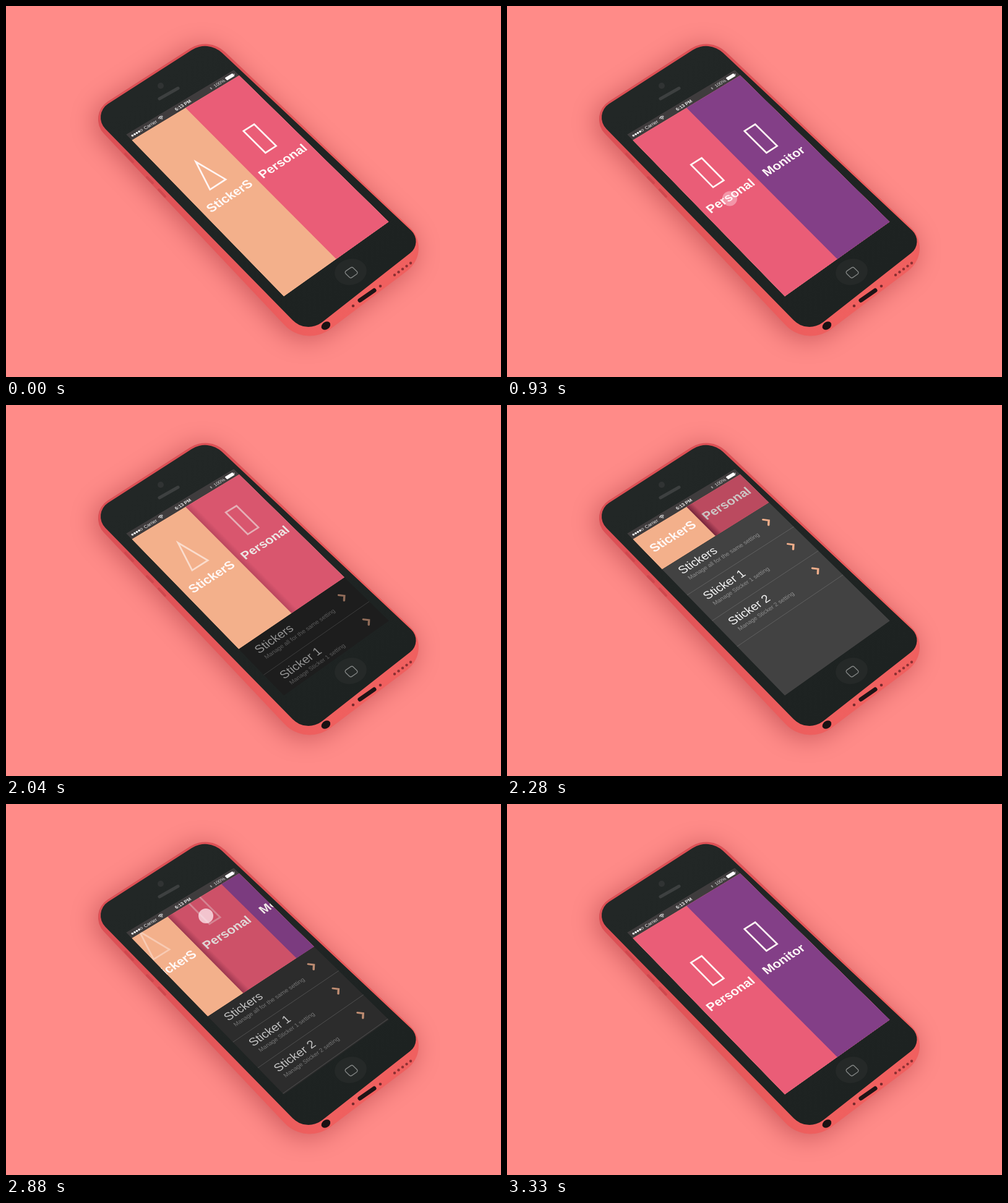
An HTML page with a canvas for the animation above (3.63 s loop, 800x600 px).

```html
<!DOCTYPE html>
<html lang="en">
<head>
<meta charset="utf-8">
<title>Tile menu on a phone</title>
<style>
  html, body { margin: 0; width: 100%; height: 100%; overflow: hidden; background: #ff8b88; }
  canvas { display: block; }
</style>
</head>
<body>
<canvas id="stage" width="800" height="600"></canvas>
<script>
const ctx = document.getElementById('stage').getContext('2d');
const LOOP = 3630, STEP = 30;
const W = 320, H = 548, HEADER = 106, ROW = 90;
const FONT = '"Liberation Sans", Arial, sans-serif';

// Corners of the screen area below the status bar
const TL = [203, 217], TR = [377, 112], BL = [449, 470], BR = [619, 349];

const TILES = [
  { name: 'StickerS', color: '#f3b08b', icon: [[80, 135], [56, 215], [103, 215]] },
  { name: 'Personal', color: '#ea5d77', icon: [[64, 133], [96, 133], [96, 213], [64, 213]] },
  { name: 'Monitor', color: '#833f87', icon: [[64, 133], [96, 133], [96, 213], [64, 213]] }
];
const ROWS = [
  ['Stickers', 'Manage all for the same setting'],
  ['Sticker 1', 'Manage Sticker 1 setting'],
  ['Sticker 2', 'Manage Sticker 2 setting']
];

const mix = (a, b, k) => a + (b - a) * k;
const clamp = k => Math.max(0, Math.min(1, k));
const ease = (t, a, b) => {
  const k = clamp((t - a) / (b - a));
  return k < 0.5 ? 2 * k * k : 1 - 2 * (1 - k) * (1 - k);
};

// Screen coordinates to stage coordinates
function project(x, y) {
  const u = x / W, v = y / H;
  return [0, 1].map(i => mix(mix(TL[i], TR[i], u), mix(BL[i], BR[i], u), v));
}

function poly(points, color) {
  ctx.beginPath();
  points.forEach(([x, y]) => ctx.lineTo(...project(x, y)));
  ctx.closePath();
  if (color) {
    ctx.fillStyle = color;
    ctx.fill();
  }
}

const box = (x0, y0, x1, y1, color) =>
  poly([[x0, y0], [x1, y0], [x1, y1], [x0, y1]], color);

// Draw with the origin at (x, y) on the tilted screen
function at(x, y, draw) {
  const o = project(x, y), r = project(x + 1, y), d = project(x, y + 1);
  ctx.save();
  ctx.transform(r[0] - o[0], r[1] - o[1], d[0] - o[0], d[1] - o[1], o[0], o[1]);
  draw();
  ctx.restore();
}

function label(text, x, y, font, color, align = 'left') {
  at(x, y, () => {
    ctx.font = font + ' ' + FONT;
    ctx.textAlign = align;
    ctx.fillStyle = color;
    ctx.fillText(text, 0, 0);
  });
}

function dot(x, y, r, color) {
  ctx.beginPath();
  ctx.arc(x, y, r, 0, 7);
  ctx.fillStyle = color;
  ctx.fill();
}

function line(x0, y0, x1, y1, width, color) {
  ctx.beginPath();
  ctx.moveTo(x0, y0);
  ctx.lineTo(x1, y1);
  ctx.lineWidth = width;
  ctx.lineCap = 'round';
  ctx.strokeStyle = color;
  ctx.stroke();
}

// Closed path through [x, y, radius] corners
function rounded(corners) {
  const n = corners.length, [a, b] = [corners[n - 1], corners[0]];
  ctx.beginPath();
  ctx.moveTo((a[0] + b[0]) / 2, (a[1] + b[1]) / 2);
  corners.forEach(([x, y, r], i) => {
    const next = corners[(i + 1) % n];
    ctx.arcTo(x, y, next[0], next[1], r);
  });
  ctx.closePath();
}

function gradient(x0, y0, x1, y1, from, to) {
  const g = ctx.createLinearGradient(x0, y0, x1, y1);
  g.addColorStop(0, from);
  g.addColorStop(1, to);
  return g;
}

function drawPhone() {
  ctx.fillStyle = '#ff8b88';
  ctx.fillRect(0, 0, 800, 600);

  rounded([[130, 176.6, 34], [327.7, 49.3, 46], [691.8, 395.2, 46], [484.7, 552.5, 56]]);
  ctx.save();
  ctx.shadowColor = 'rgba(140, 30, 40, 0.45)';
  ctx.shadowBlur = 42;
  ctx.shadowOffsetX = -5;
  ctx.shadowOffsetY = 5;
  ctx.fillStyle = gradient(200, 260, 560, 500, '#dc5055', '#f0605f');
  ctx.fill();
  ctx.restore();

  line(193, 239, 205, 252, 4, '#cf484e');
  line(228, 277, 237, 286, 4, '#cf484e');
  line(247, 297, 257, 308, 4, '#cf484e');

  rounded([[138.1, 175.6, 26], [326.4, 54.3, 40], [675.3, 382.3, 24], [485.7, 531.2, 36]]);
  ctx.fillStyle = gradient(250, 110, 560, 470, '#222726', '#1d2221');
  ctx.fill();

  dot(250, 129, 5, '#303333');
  line(248, 150, 278, 133, 5, '#3d4040');

  // Ports along the lower edge
  ctx.beginPath();
  ctx.ellipse(517, 517, 8, 6, -0.65, 0, 7);
  ctx.fillStyle = '#1a1113';
  ctx.fill();
  line(572, 476, 595, 460, 7, '#1f1416');
  [[561, 485], [605, 453]].forEach(([x, y]) => dot(x, y, 2.3, '#7b2a2d'));
  for (let i = 0; i < 5; i++) dot(628 + 6.5 * i, 435 - 4.8 * i, 2.2, '#8e3033');

  ctx.beginPath();
  ctx.ellipse(557, 430, 26, 21, -0.2, 0, 7);
  ctx.fillStyle = '#252928';
  ctx.fill();
}

function drawHome() {
  rounded([[546.5, 430.5, 3], [559.3, 421.7, 3], [569.6, 431.7, 3], [556.8, 440.5, 3]]);
  ctx.lineWidth = 1.4;
  ctx.strokeStyle = '#828584';
  ctx.stroke();
}

function drawStatus() {
  box(0, -20, W, 0, '#3f3c3d');
  for (let i = 0; i < 5; i++) {
    at(10 + 6.6 * i, -9, () => {
      ctx.beginPath();
      ctx.arc(0, 0, 2.7, 0, 7);
      ctx.fillStyle = ctx.strokeStyle = '#fff';
      ctx.lineWidth = 0.8;
      i < 4 ? ctx.fill() : ctx.stroke();
    });
  }
  label('Carrier', 45, -5, '12px', '#eee');
  at(96, -6, () => {
    ctx.strokeStyle = '#eee';
    ctx.lineWidth = 2;
    for (const r of [1, 4.5, 8]) {
      ctx.beginPath();
      ctx.arc(0, 0, r, -2.3, -0.84);
      ctx.stroke();
    }
  });
  label('6:13 PM', 160, -5, 'bold 12px', '#eee', 'center');
  box(242, -12, 245, -6, '#9a9898');
  label('100%', 253, -5, '12px', '#ddd');
  at(288, -14, () => {
    ctx.beginPath();
    ctx.roundRect(0, 0, 23, 9, 2);
    ctx.fillStyle = '#fff';
    ctx.fill();
    ctx.fillRect(24, 3, 1.5, 3);
  });
}

function drawTile(tile, i, s) {
  const left = i * 160 - s.scroll;
  if (left >= W) return;
  box(left, 0, W, s.height, tile.color);
  ctx.globalAlpha = 1 - s.fold;
  poly(tile.icon.map(([x, y]) => [left + x, y - s.lift]));
  ctx.lineWidth = 2.7;
  ctx.lineJoin = 'miter';
  ctx.strokeStyle = '#fff5f3';
  ctx.stroke();
  ctx.globalAlpha = 1;
  label(tile.name, left + 80, 267 - s.lift, 'bold 32px', '#fff8f6', 'center');
  if (!i) return;
  box(left, 0, W, s.height, `rgba(0, 0, 0, ${(i === 1 ? 0.2 : 0.1) * s.fold})`);
  if (i === 1 && s.fold > 0) {
    const [x, y] = project(left, s.height / 2);
    const shade = gradient(x, y, x + 8, y - 8, `rgba(50, 0, 25, ${0.5 * s.fold})`, 'rgba(50, 0, 25, 0)');
    box(left, 0, left + 26, s.height, shade);
  }
}

function drawList(s) {
  const g = Math.round(mix(8, 66, s.fold));
  box(0, s.height, W, H, `rgb(${g}, ${g}, ${g})`);
  ctx.globalAlpha = Math.pow(s.fold, 0.6);
  ROWS.forEach(([title, note], i) => {
    const y = s.height + i * ROW;
    label(title, 29, y + 39, '30px', '#f4f4f4');
    label(note, 33, y + 61, '15px', '#8f8f8f');
    at(282, y + 40, () => {
      ctx.beginPath();
      ctx.moveTo(-5, -10);
      ctx.lineTo(4, 0);
      ctx.lineTo(-5, 10);
      ctx.lineWidth = 5;
      ctx.lineJoin = 'miter';
      ctx.strokeStyle = '#f0ae8a';
      ctx.stroke();
    });
    line(...project(0, y + ROW), ...project(W, y + ROW), 0.8, '#676767');
  });
  ctx.globalAlpha = 1;
}

// Each gesture: visible from/to, travel from/to, start and end point
const GESTURES = [
  [30, 590, 80, 560, [236, 261], [76, 261]],
  [930, 1335, 970, 1330, [74, 261], [234, 261]],
  [1530, 1860, 1570, 1850, [78, 261], [74, 40]],
  [2580, 3240, 2640, 3190, [240, 51], [80, 51]]
];

function drawTouch(t) {
  for (const [on, off, a, b, from, to] of GESTURES) {
    if (t < on || t >= off) continue;
    const k = ease(t, a, b);
    const alpha = Math.min(0.4 + (t - on) / 250, 0.75, (off - t) / 100);
    const [x, y] = project(mix(from[0], to[0], k), mix(from[1], to[1], k));
    dot(x, y, 12, `rgba(255, 235, 240, ${alpha})`);
  }
}

// How far the tiles are folded into the header, 0 to 1
const foldAt = t => ease(t, 1860, 2280) - ease(t, 2640, 3190);

function scrollAt(t) {
  if (t < 930) return ease(t, 90, 590);
  return t < 2580 ? 1 - ease(t, 980, 1390) : ease(t, 2660, 3200);
}

function stateAt(t) {
  const fold = foldAt(t);
  return {
    fold,
    scroll: 160 * scrollAt(t),
    height: mix(H, HEADER, fold),
    lift: 209 * foldAt(t - 15)
  };
}

function render(t) {
  const s = stateAt(t);
  drawPhone();
  ctx.save();
  box(0, -20, W, H);
  ctx.clip();
  drawStatus();
  ctx.save();
  box(0, 0, W, s.height);
  ctx.clip();
  // Later tiles overlap earlier ones, each reaching the right edge
  TILES.forEach((tile, i) => drawTile(tile, i, s));
  ctx.restore();
  if (s.fold > 0) drawList(s);
  drawTouch(t);
  ctx.restore();
  drawHome();
}

const start = performance.now();
function tick() {
  const t = (performance.now() - start) % LOOP;
  render(t - t % STEP);
  requestAnimationFrame(tick);
}
tick();
</script>
</body>
</html>
```
